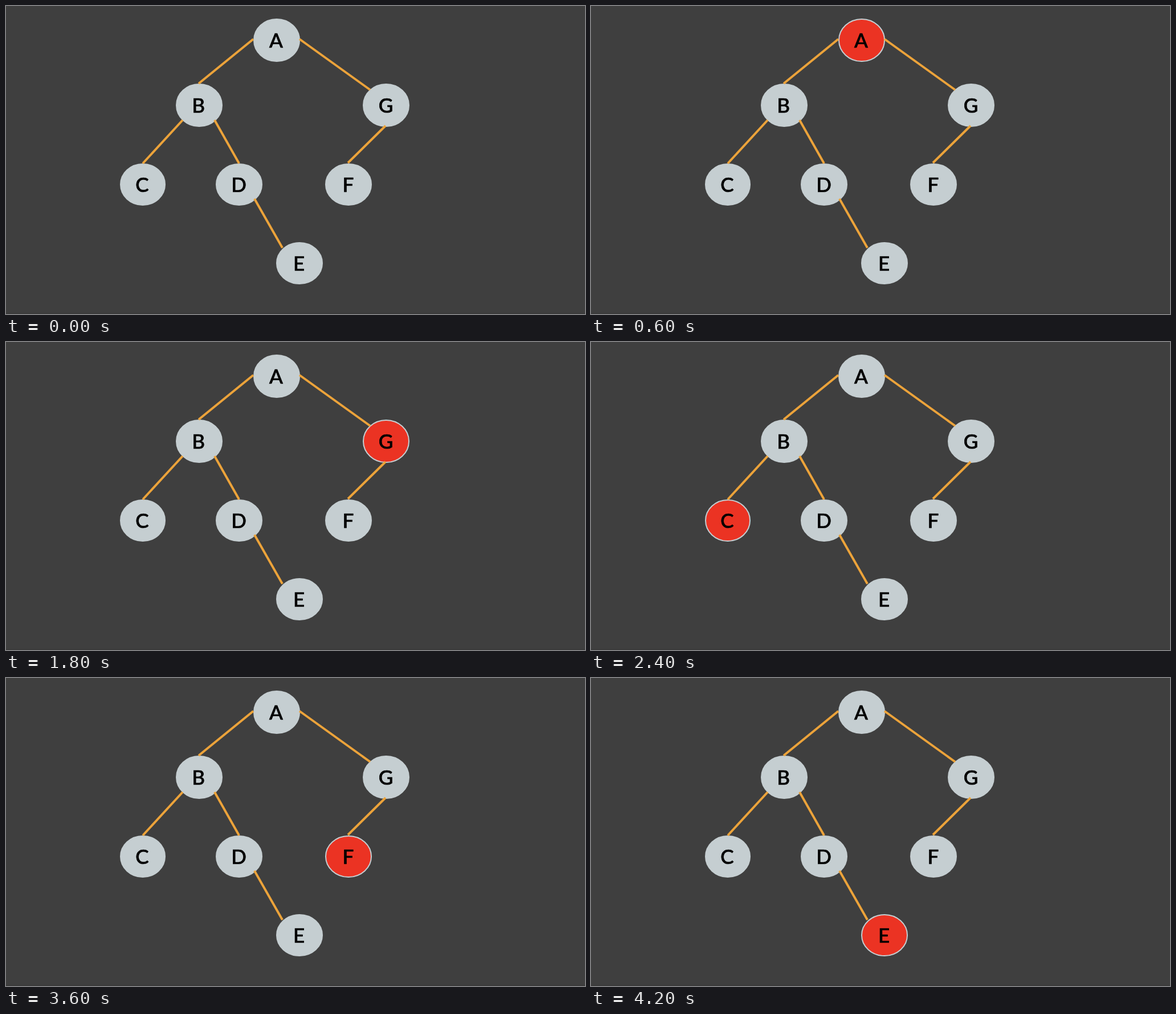
An HTML page that plays this animation: 1016x540 px, repeating every 4.8 s.

```html
<!DOCTYPE html>
<html lang="en">
<head>
<meta charset="utf-8">
<title>Level-order traversal</title>
<style>
  html, body { margin: 0; height: 100%; overflow: hidden; background: #3f3f3f; }
  svg { display: block; width: 1016px; height: 540px; }
  ellipse { fill: #c5ced1; stroke: #c5ced1; stroke-width: 2; }
  .visited { fill: #eb3323; }
  path { stroke: #eca33a; stroke-width: 4; fill: none; }
  text { font: 500 35px Lato, "Open Sans", sans-serif; text-anchor: middle; stroke: #000; stroke-width: .7; }
</style>
</head>
<body>
<svg viewBox="0 0 1016 540">
  <rect y="538" width="1016" height="2" fill="#3a3a3a"/>
  <g id="nodes"></g>
  <path d="M434 58L338 136M515 58L639 147M310 200L240 276M366 200L409 276M436 338L485 424M666 210L600 275"/>
</svg>
<script>
const STEP = 600;
// In visiting order: label, centre x, centre y, radii, label x
const nodes = [
  ["A", 475, 60, 41, 38, 474],
  ["B", 339, 174, 41, 38, 337.5],
  ["G", 667, 174, 41, 38, 666.5],
  ["C", 240, 313, 40, 37, 239],
  ["D", 409, 313, 41, 37, 408.5],
  ["F", 601, 313, 41, 37, 600.5],
  ["E", 515, 451, 41, 37, 514]
];
const group = document.getElementById("nodes");
group.innerHTML = nodes.map(([label, x, y, rx, ry, tx]) =>
  `<ellipse cx="${x}" cy="${y}" rx="${rx - 1}" ry="${ry - 1}"/>
   <text x="${tx}" y="${y + 12.5}">${label}</text>`).join("");
const ellipses = group.querySelectorAll("ellipse");

function draw() {
  // The first step shows the tree with no node visited
  const step = Math.floor(performance.now() / STEP) % (nodes.length + 1);
  ellipses.forEach((e, i) => e.classList.toggle("visited", i === step - 1));
  requestAnimationFrame(draw);
}
draw();
</script>
</body>
</html>
```
